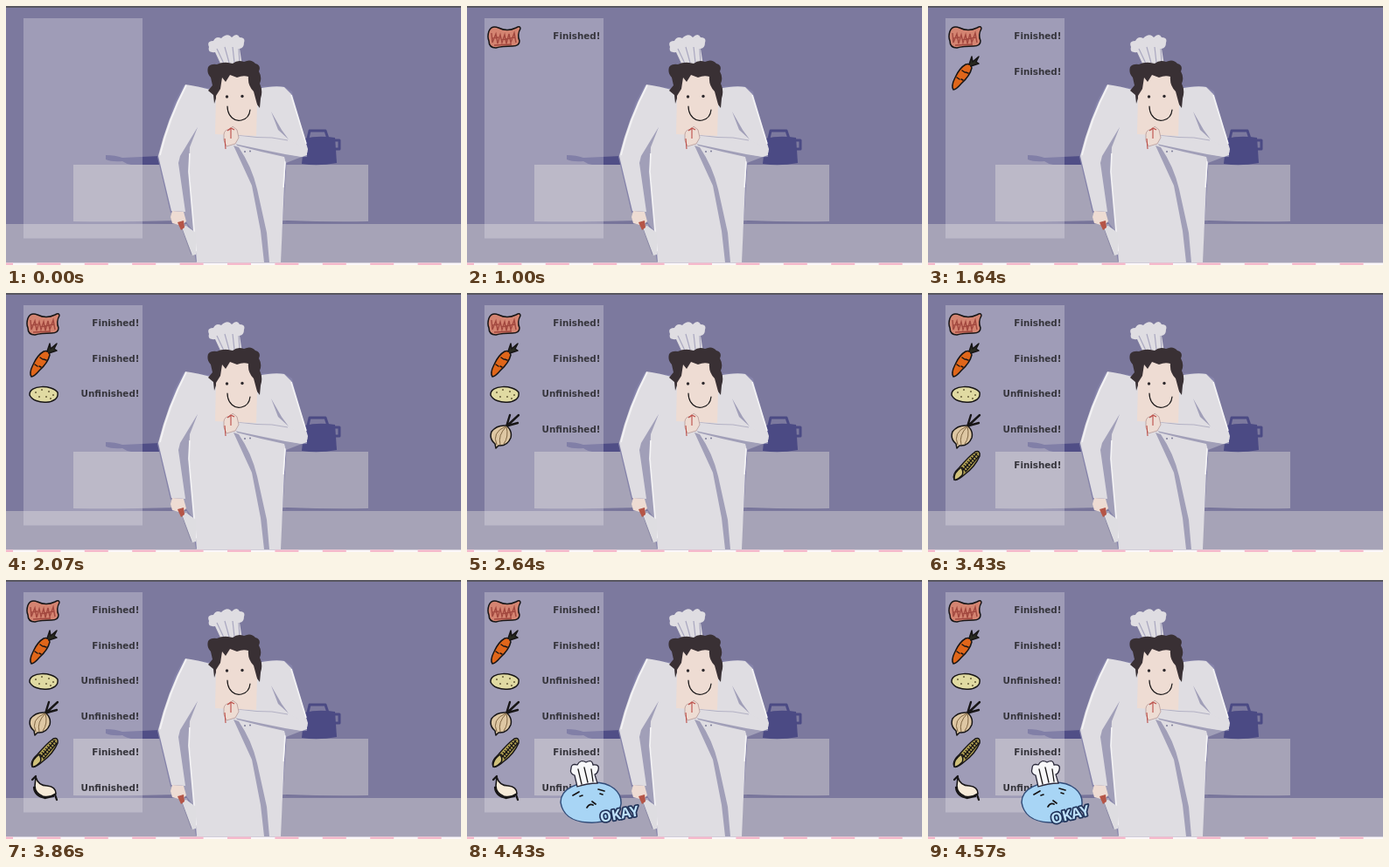
An HTML page that plays this animation: 520 px wide and 297 px high, repeating every 6000 ms.

```html
<!DOCTYPE html>
<html lang="en">
<head>
<meta charset="utf-8">
<title>Kitchen checklist</title>
<style>
html, body { margin: 0; width: 100%; height: 100%; overflow: hidden; background: #7c799e; }
svg { display: block; width: 100vw; height: 100vh; }
.label { font: bold 10.35px "DejaVu Sans", sans-serif; fill: #36353c; text-anchor: end; }
.okay { font: bold 16.5px "Open Sans", sans-serif; fill: #bfe1f9; stroke: #21345a; stroke-width: 3.4; paint-order: stroke; stroke-linejoin: round; }
.ink { fill: none; stroke: #171516; stroke-width: 1.5; stroke-linecap: round; stroke-linejoin: round; }
.coat { fill: #dfdde2; }
.shade { fill: #a19fb8; }
.skin { fill: #eedcd3; }
.hair { fill: #393034; }
</style>
</head>
<body>
<svg viewBox="0 0 520 297" preserveAspectRatio="none">
  <g id="kitchen">
    <rect width="520" height="297" fill="#7c799e"/>
    <rect width="520" height="2" fill="#57565f"/>
    <rect y="250" width="520" height="47" fill="#a6a3b7"/>
    <path d="M130 247H190V250Q160 250 130 247ZM320 246H414V248Q370 250 320 248Z" fill="#77749a"/>
    <path d="M77 182H414V247Q370 248 322 246H190Q130 248 77 247Z" fill="#a6a3b7"/>
    <path d="M114 171Q125 171 133 174L176 172V182H143Q137 181 133 178Q121 179 114 176Z" fill="#504e86"/>
    <path d="M345 152L347 143H365L368 152M375 154H381V164H376" fill="none" stroke="#4b4a84" stroke-width="3" stroke-linejoin="round"/>
    <path d="M341 152Q357 148 376 151L378 180Q357 184 338 181Z" fill="#4b4a84"/>
    <g id="cloth"><rect y="294.5" width="520" height="3" fill="#fbf7fa"/></g>
  </g>

  <g id="chef">
    <path d="M203 91L192 112L173 173L188 237L204 240L214 275L217 293H313L321 174L344 173L343 160L327 98L317 92L280 92L232 94Z" fill="#8583aa"/>
    <path class="shade" d="M219 139L197 174L196 182L203 244L217 262L212 185Z"/>
    <path class="coat" d="M205 90Q220 92 237 97L288 95Q306 91 318 93L326 101L345 164Q345 172 337 173L320 172L318 205L314 294H218L209 185L210 162L219 139L199 172L197 180L205 236L189 235L174 172Q184 130 205 90Z"/>
    <path d="M206 91Q187 127 176 171M210 169L209 190L217 281M326 102L343 158M319 178L317 208" fill="none" stroke="#f4f3f5" stroke-width="1.7"/>
    <path class="shade" d="M303 121L311 142L323 153L315 142ZM262 157Q290 163 318 169L338 173L320 180L318 173Q290 167 264 160Z"/>
    <path class="shade" d="M260 160L266 162Q281 184 287 210L298 260L301 294H295L291 258L281 206Z"/>
    <path class="coat" d="M262 147Q281 150 303 150L323 153L344 164V171L338 173L319 170Q289 164 261 158Z"/>
    <path d="M264 148Q284 151 304 151L322 154" fill="none" stroke="#b3b1c4" stroke-width="1.2"/>
    <circle cx="273" cy="167" r="1" fill="#7d7b99"/><circle cx="279" cy="166.500" r="1" fill="#7d7b99"/>

    <path class="coat" d="M246 68L239 53Q230 54 232 47Q229 40 237 40Q240 34 246 37Q253 30 258 36Q264 30 267 36Q274 36 272 42Q272 48 267 49L270 68Z"/>
    <path d="M241 49L249 66M250 47L255 65M259 47L261 65M266 49L267 65" fill="none" stroke="#a9a7bf" stroke-width="1.2"/>
    <path class="hair" d="M231 70Q234 66 241 67Q249 63 259 66Q265 61 272 64Q280 60 285 66Q292 68 289 75Q293 82 290 89Q294 97 291 106L290 117L284 109L241 103L238 112L237 102L231 97L236 91L234 82Q229 77 231 70Z"/>
    <path class="skin" d="M247 82L251 87L256 79L264 82Q271 79 277 81Q276 91 283 98L287 113L286 149L263 148L239 147L240 103L245 95Z"/>
    <circle cx="252.500" cy="104" r="1.700" fill="#2e292d"/><circle cx="270" cy="103.500" r="1.700" fill="#2e292d"/>
    <path class="ink" d="M253 115C253 127 262 133 269 131Q278 129 279 119" style="stroke-width:1.2"/>
    <path class="skin" d="M249 147Q250 141 256 142L259 138L264 142L266 151L262 158L252 161L249 154Z" stroke="#b79a98" stroke-width=".8"/>
    <path d="M253 143L257 140L261 142M257 141L257 152M250 152L251 164" fill="none" stroke="#bd4d47" stroke-width="1.1"/>

    <path d="M200 254L206 252L217 260V285L213 286Z" fill="#dedde1"/>
    <path d="M201 255L212 285" fill="none" stroke="#8a88a5" stroke-width="1"/>
    <path class="skin" d="M190 235L203 236L206 247L201 252L190 249L188 242Z"/>
    <path d="M196 248L203 246L204 254L200 257Z" fill="#b55547"/>
  </g>

  <rect x="20" y="14" width="136" height="252.500" fill="#e9e7ec" opacity=".32"/>

  <g class="item">
    <path class="ink" d="M25 29Q28 22 36 25Q46 30 56 25Q61 22 61 26Q57 33 60 40Q60 46 52 46Q40 46 33 48Q25 48 25 40Q23 35 25 29Z" style="fill:#d48471"/>
    <path d="M28 31L29 42L33 32L35 43L38 33L40 42L43 33L45 43L48 32L50 42L54 31L56 42M29 37L36 36M39 39L55 36M31 45L51 44" fill="none" stroke="#a2483f" stroke-width="1.4"/>
  </g>
  <g class="item">
    <path class="ink" d="M29 96Q26 92 31 82Q36 71 43 67Q49 65 50 71Q48 80 38 89Q32 96 29 96Z" style="fill:#e0661a"/>
    <path class="ink" d="M47 67L50 58L51 64L58 58L55 64L58 66L49 69M39 74L42 76M46 77L43 76M33 82L36 84M40 85L38 84" style="fill:#292a20"/>
  </g>
  <g class="item">
    <path class="ink" d="M27 117C26 105 53 105 59 114C62 128 32 129 27 117Z" style="fill:#e0daa2"/>
    <path d="M33 114h2M40 111h2M48 113h2M53 117h2M45 119h2M37 119h2M50 121h2" stroke="#675d3a" stroke-width="1.5"/>
  </g>
  <g class="item">
    <path class="ink" d="M45 153L49 140M45 153L59 140M47 152L58 149" style="stroke-width:2.4"/>
    <path class="ink" d="M45 152Q52 158 50 166Q46 176 36 175L33 178L32 173Q25 167 28 159Q34 151 45 152Z" style="fill:#dec7a3"/>
    <path d="M44 153Q28 160 34 174M45 153Q35 163 38 174M45 153Q48 165 42 173" fill="none" stroke="#806643" stroke-width="1"/>
  </g>
  <g class="item">
    <path class="ink" d="M30 214Q27 208 36 200Q46 188 54 182Q60 180 59 187Q54 199 42 208Q33 216 30 214Z" style="fill:#b3a253"/>
    <path class="ink" id="kernels" style="stroke-width:1.2"/>
    <path class="ink" d="M30 214Q29 206 38 200Q41 205 39 209Q33 215 30 214Z" style="fill:#cfc07a"/>
  </g>
  <g class="item">
    <path class="ink" d="M34 226Q37 236 47 236Q57 237 57 245Q50 250 42 248Q33 244 33 236Z" style="fill:#f6ead8;stroke-width:1.6"/>
    <path class="ink" d="M34 225L30 229M56 246L58 252M32 238Q33 248 45 250L54 248" style="stroke-width:2.3"/>
  </g>
  <g id="labels"></g>

  <g id="sticker">
    <path d="M107 255C107 238 128 232 144 232C165 232 177 243 176 257C174 275 153 279 138 278C119 277 109 268 107 255Z" fill="#a8d5f5" stroke="#304b78" stroke-width="1.500"/>
    <path d="M126 237L123 224Q117 222 119 216Q119 210 126 212Q130 205 136 209Q143 205 144 212Q152 211 150 218Q149 222 146 223L149 233Q138 233 126 237Z" fill="#f7f7f9" stroke="#29283a" stroke-width="1.300"/>
    <path class="ink" d="M127 217L131 234M134 215L138 232M142 217L144 231" style="stroke-width:1.3"/>
    <g id="face" class="ink" style="stroke-width:1.7">
      <path d="M121 246L128 242M150 239L157 241M129 247L132 246M152 244L155 245M137 260Q140 255 144 257M143 253L147 256"/>
    </g>
    <text id="okay" class="okay">OKAY</text>
  </g>
</svg>
<script>
const LOOP = 6000;
const svg = document.querySelector("svg");
const byId = id => document.getElementById(id);

function add(parent, tag, attrs, text = "") {
  const node = document.createElementNS(svg.namespaceURI, tag);
  for (const key in attrs) node.setAttribute(key, attrs[key]);
  node.textContent = text;
  parent.append(node);
  return node;
}

for (let i = 0; i < 10; i++) {
  add(byId("cloth"), "rect", { x: -19 + i * 54.4, y: 294.5, width: 27, height: 3, fill: "#f6b9cc" });
}

// Short diagonal rows of kernels along the cob.
let rows = "";
for (let i = 0; i < 8; i++) {
  const x = 39 + i * 2.1, y = 200 - i * 2.3;
  rows += `M${x} ${y}l4 4`;
}
byId("kernels").setAttribute("d", rows + "M40 203L56 184M43 205L58 187");

const items = [...document.querySelectorAll(".item")];
const starts = [790, 1430, 2070, 2570, 3210, 3860];
const done = [1, 1, 0, 0, 1, 0];
const labels = done.map((ok, i) => add(byId("labels"), "text",
  { class: "label", x: 152.5, y: 38 + i * 40.7 }, ok ? "Finished!" : "Unfinished!"));

function show(node, on) {
  node.style.visibility = on ? "visible" : "hidden";
}

function update(t) {
  starts.forEach((start, i) => {
    show(items[i], t >= start);
    show(labels[i], t >= start);
  });
  show(byId("sticker"), t >= 4430);
  const settled = t >= 4570;
  byId("okay").setAttribute("transform", settled
    ? "translate(142 280) rotate(-14)"
    : "translate(153 278) rotate(-10)");
  byId("face").setAttribute("transform", settled ? "" : "translate(0 1)");
}

const origin = performance.now();
function tick() {
  update((performance.now() - origin) % LOOP);
  requestAnimationFrame(tick);
}
tick();
</script>
</body>
</html>
```
